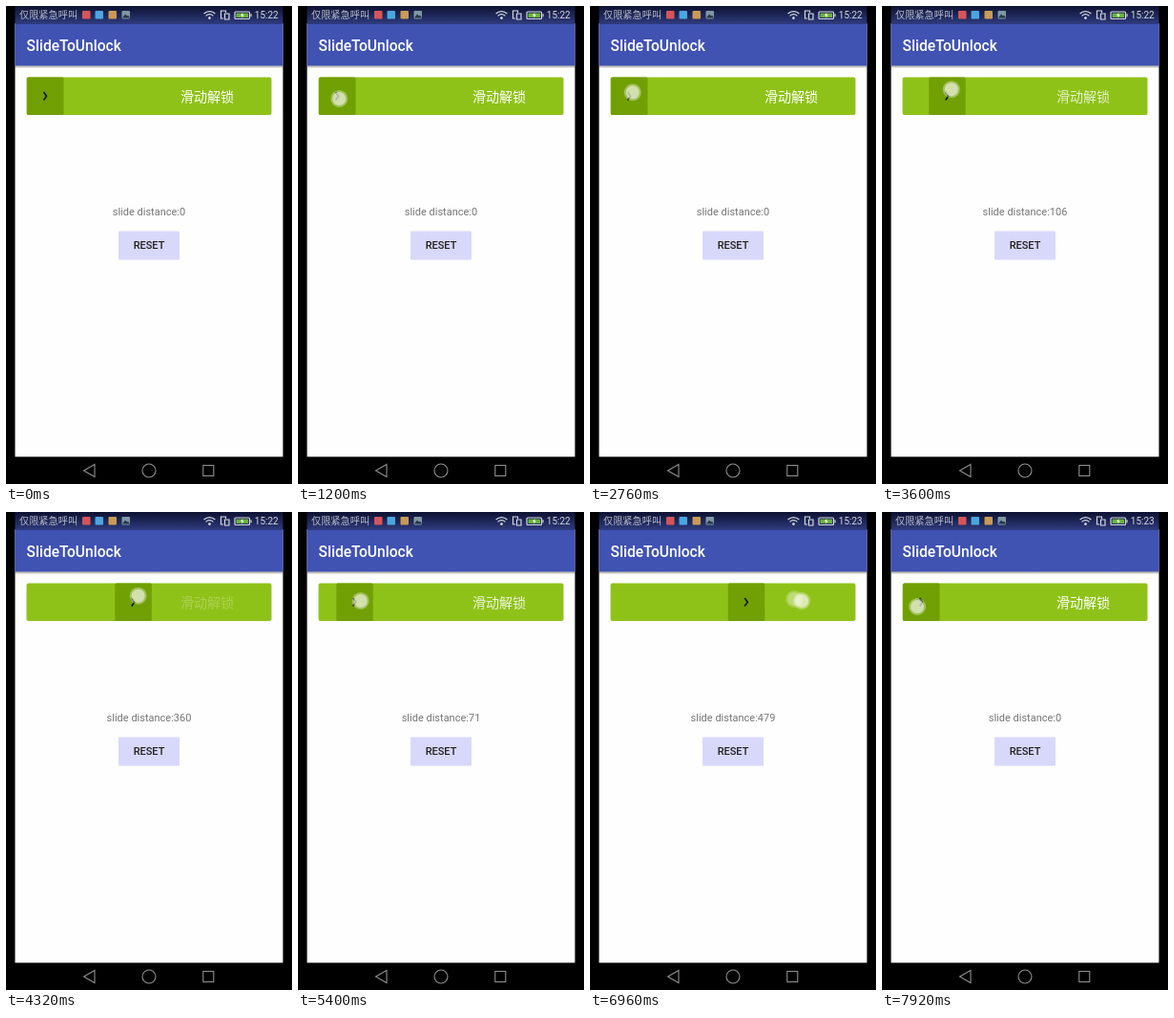
Write an HTML page that moves like this. It is 300 px wide and 500 px high and loops after 8 s.

```html
<!DOCTYPE html>
<html lang="zh">
<head>
<meta charset="utf-8">
<title>Slide to unlock</title>
<style>
html, body { margin: 0; width: 100%; height: 100%; overflow: hidden; background: #000; }
svg { display: block; width: 300px; height: 500px; }
text { font-family: Roboto, "Noto Sans CJK SC", "Noto Sans CJK", sans-serif; }
.mid { text-anchor: middle; }
.medium { font-weight: 500; }
.status { font-size: 10px; fill: #b9bdcc; }
</style>
</head>
<body>
<svg viewBox="0 0 300 500">
  <defs>
    <linearGradient id="statusFill" x2="0" y2="1">
      <stop offset="0" stop-color="#0d1130"/>
      <stop offset="1" stop-color="#2f3c80"/>
    </linearGradient>
    <linearGradient id="shade" x2="0" y2="1">
      <stop offset="0" stop-opacity=".35"/>
      <stop offset="1" stop-opacity="0"/>
    </linearGradient>
    <g id="dot">
      <circle r="9" fill="#fff" opacity=".35"/>
      <circle r="7" fill="#fff" opacity=".5"/>
    </g>
  </defs>

  <rect width="300" height="500"/>
  <rect x="9.5" y="18" width="281" height="453.5" fill="#fefefe"/>
  <rect x="9.5" width="281" height="19" fill="url(#statusFill)"/>
  <rect x="9.5" y="19" width="281" height="43.5" fill="#4052b2"/>
  <rect x="9.5" y="62.5" width="281" height="3" fill="url(#shade)"/>

  <text class="status" x="14" y="13.3" style="font-size:10.2px">仅限紧急呼叫</text>
  <rect x="80" y="5" width="8.5" height="8.5" rx="1" fill="#d5555a"/>
  <rect x="93.5" y="5" width="8.5" height="8.5" rx="1" fill="#4aa5e0"/>
  <rect x="107.5" y="5" width="8.5" height="8.5" rx="1" fill="#c99a55"/>
  <rect x="121.5" y="5" width="8.5" height="8.5" rx="1" fill="#7f97a5"/>
  <path d="M122 12.5l3-4 2 2 1-1 2 3z" fill="#26374a"/>
  <g fill="none" stroke="#d5d8e2" stroke-width="1.2">
    <path d="M207.6 8a8.5 8.5 0 0 1 11.8 0M209.6 10.3a5.5 5.5 0 0 1 7.8 0"/>
    <circle cx="213.5" cy="12.6" r=".8" fill="#d5d8e2"/>
    <path d="M228 13h-2.500v-8h5v2M229.500 8h4.500v6h-4.500z"/>
    <rect x="240" y="6" width="15.500" height="7.500" rx="1"/>
    <path d="M257 8.300v3"/>
  </g>
  <rect x="241.500" y="7.500" width="12.500" height="4.500" fill="#68b43c"/>
  <path d="M248.500 6.800l-2.500 3.200h1.800l-.8 2.700 2.700-3.400h-1.800z" fill="#fff"/>
  <text class="status" id="clock" x="260.800" y="13.200" style="fill:#d5d8e2"></text>

  <text class="medium" x="21.500" y="47" font-size="15.600" fill="#fff">SlideToUnlock</text>

  <rect x="21.500" y="74.500" width="257" height="39.500" rx="2" fill="#8fc218"/>
  <text class="mid" id="hint" x="211" y="100.300" font-size="14" fill="#fff">滑动解锁</text>
  <g id="handle">
    <rect y="74.500" width="38.500" height="39.500" rx="1.500" fill="#70a004"/>
    <path d="M17.500 90l3 4.200-3 4.200" fill="none" stroke="#141c04" stroke-width="1.700"/>
  </g>

  <text class="mid" id="label" x="150" y="219" font-size="11" fill="#757575"></text>
  <rect x="118" y="235.500" width="64" height="30" rx="1" fill="#d8d8fb"/>
  <text class="mid medium" x="150" y="254.300" font-size="11" fill="#202020">RESET</text>

  <g fill="none" stroke="#8f8f8f" stroke-width="1.100">
    <path d="M93 479.500v13l-11.500-6.500z"/>
    <circle cx="150" cy="486" r="7"/>
    <rect x="206.800" y="480.500" width="11" height="11"/>
  </g>

  <use id="trail" href="#dot" opacity=".6"/>
  <use id="touch" href="#dot"/>
</svg>
<script>
const LOOP = 8000, STEP = 120;
const LEFT = 22;      // handle position at rest
const UNIT = 3.9;     // counted distance per pixel
const DRAG = 369;     // distance of an unhurried drag
const FLICK = 784;    // distance of the final fling
const DOWN = 1080, FIRST = 1200, PAUSE = 2760, SECOND = 3120;
const FLING = 5786, RELEASE = 7020, HOME = 7320, AGAIN = 7920;
const LAG = 127;      // handle trails the finger in a fling

const $ = id => document.getElementById(id);
const handle = $("handle"), hint = $("hint"), label = $("label"),
      clock = $("clock"), touch = $("touch"), trail = $("trail");

const phase = (t, from, to) => Math.min(1, Math.max(0, (t - from) / (to - from)));
const outAndBack = p => DRAG * Math.sin(Math.PI * p) ** 2;

// How far the finger has pulled
function pull(t) {
  if (t < SECOND) return outAndBack(phase(t, FIRST, PAUSE));
  if (t < FLING) return outAndBack(phase(t, SECOND, FLING));
  return FLICK * phase(t, FLING, RELEASE) ** 3;
}

// How far the handle has moved
function slide(t) {
  if (t < FLING) return pull(t);
  const flung = pull(Math.max(FLING, Math.min(t, RELEASE) - LAG));
  return flung * (1 - phase(t, RELEASE, HOME)) ** 2;
}

function finger(t) {
  if (t >= AGAIN) return [37, 99];
  const grip = 20 + t / 1000;
  const y = t < FLING ? 92 + 5 * Math.cos((t - DOWN) / 880) : 93;
  return [LEFT + grip + pull(t) / UNIT, y];
}

const place = (el, x, y) => el.setAttribute("transform", `translate(${x} ${y})`);
const show = (el, on) => { el.style.display = on ? "" : "none"; };

function draw(t) {
  const dist = slide(t);
  place(handle, LEFT + dist / UNIT, 0);
  hint.setAttribute("opacity", Math.max(0, 1 - dist / 480));
  label.textContent = "slide distance:" + Math.round(dist);
  clock.textContent = t < 6000 ? "15:22" : "15:23";

  const down = t >= DOWN && t < RELEASE || t >= AGAIN;
  const [x, y] = finger(t), [oldX] = finger(t - 18);
  show(touch, down);
  place(touch, x, y);
  show(trail, down && t < RELEASE && x - oldX > 4);
  place(trail, oldX, y - 2);
}

function tick() {
  const t = performance.now() % LOOP;
  draw(Math.floor(t / STEP) * STEP);
  requestAnimationFrame(tick);
}
tick();
</script>
</body>
</html>
```
